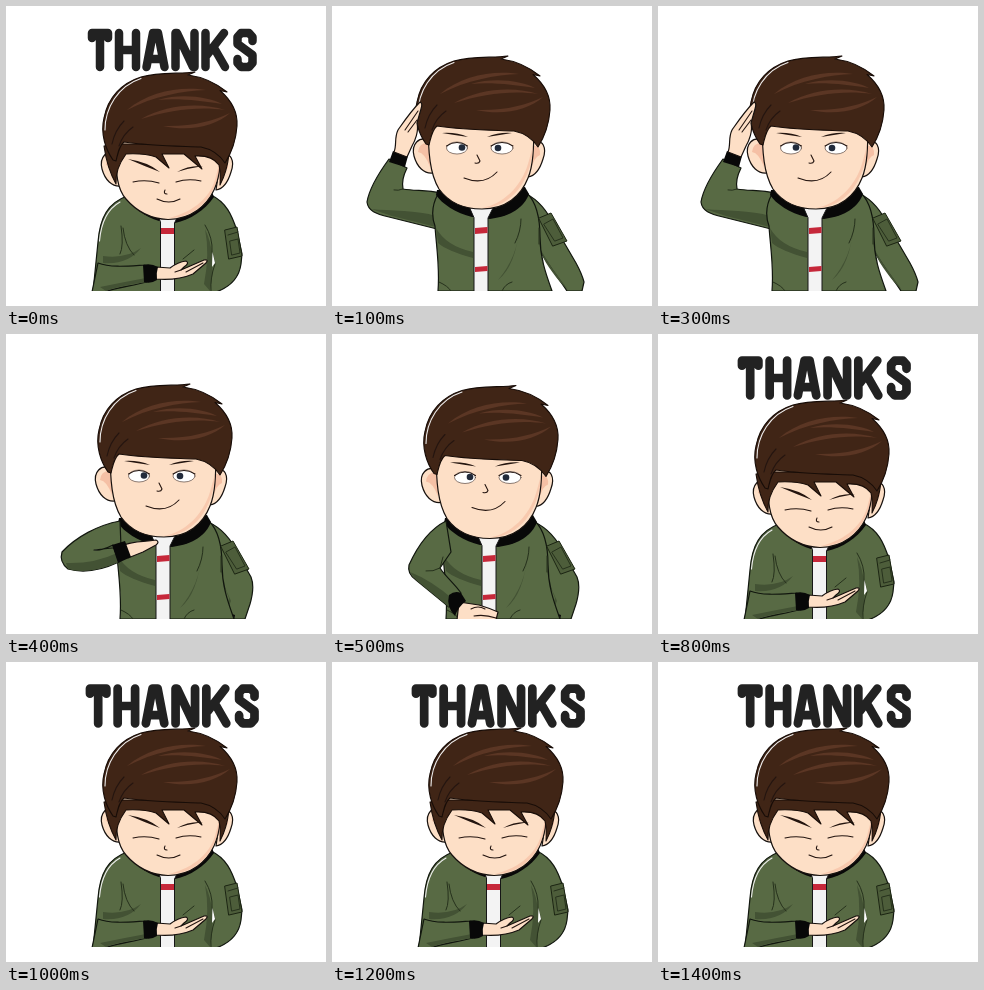
Animation of 320 by 300 pixels, one loop 1500 ms. Source, as an HTML page:

```html
<!DOCTYPE html>
<html lang="en">
<head>
<meta charset="utf-8">
<title>Thanks</title>
<style>
html, body { margin: 0; width: 100%; height: 100%; overflow: hidden; background: #fff; }
svg { display: block; width: 100%; height: 100%; }
path, ellipse { stroke-linejoin: round; stroke-linecap: round; }
.skin { fill: #fddfc6; stroke: #17110e; stroke-width: 1.2; }
.shade { fill: #f3b497; }
.jacket { fill: #586a44; stroke: #11160e; stroke-width: 1.2; }
.fold { fill: #435234; }
.crease { fill: none; stroke: #26311c; stroke-width: 1; }
.patch { fill: #4d5d3a; stroke: #1b2412; stroke-width: 1; }
.black { fill: #080808; }
.shirt { fill: #f3f3f3; stroke: #161616; stroke-width: 1; }
.red { fill: #c6283a; }
.line { fill: none; stroke: #241510; stroke-width: 1.1; }
.brow { fill: #24150f; }
.hair { fill: #402516; stroke: #170c07; stroke-width: 1.1; }
.shine { fill: #5b3624; }
.rim { fill: none; stroke: #eee; stroke-width: 1.1; }
.letters { fill: none; stroke: #222; stroke-width: 8.5; stroke-linecap: square; }
</style>
</head>
<body>
<svg viewBox="0 0 320 300">
<defs>
  <clipPath id="crop"><path d="M0 0H320V285H0Z"/></clipPath>
  <g id="ears">
    <path class="skin" d="M105 134C95 130 87 138 90 150C93 161 100 168 109 167Z"/>
    <path class="skin" d="M209 137C219 132 223 142 219 153C216 163 211 170 204 171Z"/>
    <path class="shade" d="M105 137Q95 136 94 146Q101 147 106 161ZM209 140Q217 139 216 149Q210 151 207 164Z" opacity=".7"/>
  </g>
  <g id="hair">
    <path class="hair" d="M102 138C95 128 89 112 93 96C97 75 111 61 130 55C148 50 168 52 184 50L177 53C192 55 205 61 216 70L209 68.500C220 78 227 89 226 104C225 118 221 130 214 141C208 132 200 127 190 125C165 124 140 124 113 120C108 124 107 131 105 139Z"/>
    <path class="rim" d="M94 108C94 86 107 64 130 56.500"/>
    <path class="shine" d="M116 88C138 69 170 64 195 68C171 69 143 74 116 88ZM130 97C156 82 190 80 214 88C188 84 159 88 130 97ZM147 78C171 71 197 75 211 82C191 79 168 76 147 78ZM152 104C181 105 202 99 219 91C204 104 180 110 152 104Z"/>
    <path class="line" d="M101 122Q104 108 113 99M108 124Q112 112 122 105"/>
  </g>
</defs>

<g clip-path="url(#crop)">
  <g id="stand">
    <g id="armRight">
      <path class="jacket" d="M202 188C215 194 224 206 231 221L252 257Q258 268 260 276L258 285H243C233 270 220 253 212 238Z"/>
      <path class="fold" d="M213 236C222 256 235 271 244 284L236 276C225 262 217 251 213 236Z"/>
    </g>
    <g id="armRightIn">
      <path class="jacket" d="M202 188C216 194 226 206 233 222L245 243Q249 253 244 270L239 285H218L221 267L212 240Z"/>
      <path class="fold" d="M213 240L225 267L220 279L223 264Z"/>
      <path class="black" d="M217 277L229 281L228 286H214Z"/>
    </g>
    <g id="saluteSleeve">
      <path class="jacket" d="M116 187C104 184 91 185 79 183Q77 174 83 162L65 153C54 168 45 184 43 196C44 205 52 208 65 211L113 223Z"/>
      <path class="fold" d="M47 203C66 205 94 204 112 210V221L68 210Z"/>
      <path class="crease" d="M79 183Q74 185 70 184"/>
      <path class="black" d="M69 145L84 150L81 161L65 156Z"/>
    </g>
    <path class="jacket" d="M114 188C130 202 180 204 203 187C212 196 216 211 216 231C216 252 222 268 228 285H114C116 260 112 238 111 220C107 209 109 197 114 188Z"/>
    <path class="fold" d="M112 222Q122 240 149 246V252Q123 245 114 237ZM196 218Q194 251 174 274Q192 260 196 218Z"/>
    <path class="crease" d="M115 276Q124 280 127 285M197 213Q197 225 191 237M178 285Q181 278 188 276M215 238V222"/>
    <path class="black" d="M113 184L201 181L205 188C200 201 188 210 166 213L148 211C132 207 118 198 112 189Z"/>
    <path class="shirt" d="M146 202H169L164 212V286H150V212Z"/>
    <path class="red" d="M151 222L163.500 221V227L151 228ZM151 261L163.500 260V265L151 266Z"/>
    <path class="patch" d="M215 212L227 207L243 235L229 240Z"/>
    <path class="crease" d="M220 218L229 213L239 232L231 235Z"/>

    <g id="standHead">
      <use href="#ears"/>
      <path class="skin" d="M104 112C104 148 106 168 115 183C125 197 140 203 158 203C182 203 197 190 204 172C209 160 210 145 210 112Z"/>
      <path class="shade" d="M209 140C208 173 188 202 158 202C179 198 197 181 204 158Z" opacity=".5"/>
      <path class="brow" d="M118 127Q132 126 144 131Q130 129 118 127ZM163 131Q175 126 188 127Q176 129 163 131Z"/>
      <g fill="#fff" stroke="#5b4a43" stroke-width=".7">
        <ellipse cx="133" cy="142" rx="10.500" ry="6"/>
        <ellipse cx="178" cy="142" rx="11" ry="6"/>
      </g>
      <path class="line" d="M122.500 140Q133 133 143.500 140M167 140Q178 133 189 140"/>
      <g fill="#222b3b"><circle cx="138" cy="141.500" r="3.300"/><circle cx="174" cy="142" r="3.300"/></g>
      <path class="line" d="M153 149L156 155Q155 158 151 157M140 172Q160 180 173 166"/>
      <use href="#hair"/>
    </g>

    <g id="saluteHand">
      <path class="skin" d="M70 146C73 139 70 132 74 124C81 114 87 105 96 96Q99 97 97 103L93 117C95 125 91 135 88 140L83 151Z"/>
      <path class="line" d="M81 124L94 105M84 126L93 114"/>
    </g>
    <g id="lowerArm">
      <path class="jacket" d="M114 187C92 191 70 203 56 218Q53 228 62 235C79 240 98 235 113 228L107 211Q95 217 88 216L115 213Z"/>
      <path class="fold" d="M60 229Q88 230 111 219L113 228Q83 241 62 235Z"/>
      <path class="skin" d="M118 211C127 207 137 208 150 206Q154 208 150 211L137 218L122 224Z"/>
      <path class="black" d="M106 211L119 207L125 223L112 229Z"/>
    </g>
    <g id="bellyArm">
      <path class="skin" d="M127 268L147 271Q157 274 166 278L164 286H125Z"/>
      <path class="line" d="M142 282Q152 280 164 284M139 275Q146 271 153 275"/>
      <path class="jacket" d="M114 187C98 195 86 211 77 231Q75 240 84 246L117 273L129 259C122 249 112 241 108 234L119 218Z"/>
      <path class="fold" d="M78 238Q99 246 122 266L117 273L84 246Z"/>
      <path class="crease" d="M108 234Q101 238 94 237M111 223L108 234"/>
      <path class="black" d="M117 261Q123 256 129 259L134 267Q126 273 123 282Q114 273 117 261Z"/>
    </g>
  </g>

  <g id="bow">
    <path class="jacket" d="M121 190C102 197 94 211 92 236L87 286H210C224 281 233 273 235 258L236 248L231 225C226 209 220 196 205 189Z"/>
    <path class="fold" d="M97 250Q120 253 135 242Q122 259 97 257ZM204 285C209 261 207 239 199 223Q204 248 198 278Z"/>
    <path class="crease" d="M117 222Q119 240 128 249M199 219Q207 232 206 246L209 258Q204 272 205 285M188 244L177 253M115 220Q118 240 114 248"/>
    <path d="M206.500 246L209 257L206 261Z" fill="#fff"/>
    <path class="rim" d="M93.500 235Q96 206 114 196"/>
    <path class="black" d="M120 189L206 186L208 191C199 204 184 214 169 217L153 215C139 211 126 201 120 189Z"/>
    <path class="shirt" d="M151 208H173L168.500 217V286H154.500V216Z"/>
    <path class="red" d="M155 222H168V228H155Z"/>
    <path class="patch" d="M219 224L231 221L236 250L223 253Z"/>
    <path class="crease" d="M224 235L232 233L234 247L226 249ZM222 229L232 226"/>
    <path class="jacket" d="M92 257C105 262 123 260 139 259L141 276C126 280 108 282 99 286H86Z"/>
    <path class="fold" d="M94 281Q118 276 140 272L141 276Q112 280 100 285Z"/>
    <path class="skin" d="M150 261L164 262Q172 256 180 255Q184 257 178 261L175 264L198 254Q203 253 200 257L187 268Q171 275 149 273Z"/>
    <path class="line" d="M175 264L169 266M180 266L197 257"/>
    <path class="black" d="M137 259Q145 257 152 261Q150 267 151 274Q145 278 138 276Z"/>

    <use href="#ears" x="6" y="13"/>
    <path class="skin" d="M110 130C109 172 112 184 120 193C132 207 147 213 162 213.500C186 213 201 199 208 184C213 173 215 160 215 130Z"/>
    <path class="shade" d="M214 155C213 188 192 212 163 212C188 206 206 190 210 170Z" opacity=".5"/>
    <path class="brow" d="M122 153Q142 156 154 166Q138 160 122 153ZM171 166Q182 159 197 160Q184 162 171 166Z"/>
    <path class="line" d="M127 176Q140 173 153 177M170 176Q182 172 195 175M159 184Q157 188 161 188M151 193Q163 199 174 193"/>
    <path class="hair" d="M98 140Q101 162 110 178Q109 163 120 148Q138 147 150 151L163 162L156 148H178L196 163L189 150Q206 149 213 159Q215 168 214 179Q221 166 223 148L210 138H112Z"/>
    <use href="#hair" x="5" y="16" clip-path="url(#bowHair)"/>
  </g>
</g>
<clipPath id="bowHair"><path d="M80 40H240V148H80Z"/></clipPath>

<g id="thanks" class="letters" role="img" aria-label="THANKS">
  <path d="M86 32V27H102V32M94 27V61"/>
  <path d="M113 27V61M130 27V61M113 44H130"/>
  <path d="M140.500 61L147 27H152L158.500 61M145 53H154"/>
  <path d="M169.500 61V27H171L187 61H188.500V27"/>
  <path d="M199.500 27V61M218 27L201 49M207.500 41L219 61"/>
  <path d="M246.500 35V31L243 27H235L231.500 31V38L246.500 49V57L243 61H235L231.500 57V53"/>
</g>
</svg>
<script>
const STEP = 100, LOOP = 1500;
const $ = id => document.getElementById(id);
const show = (id, on) => $(id).style.display = on ? '' : 'none';

function textScale(step) {
  if (step === 7) return 1.012;
  return step >= 8 && step % 2 === 0 ? 1.025 : 1;
}

function draw(step) {
  const standing = step >= 1 && step <= 5, salute = step <= 3;
  show('stand', standing);
  show('bow', !standing);
  show('thanks', !standing);
  ['saluteSleeve', 'saluteHand', 'armRight'].forEach(id => show(id, salute));
  show('armRightIn', !salute);
  show('lowerArm', step === 4);
  show('bellyArm', step === 5);
  $('stand').setAttribute('transform', `translate(${step < 3 ? -8 : 0} 0)`);
  $('standHead').setAttribute('transform', `translate(0 ${step === 5 ? 1.5 : 0})`);
  $('thanks').setAttribute('transform', `translate(166.5 44) scale(${textScale(step)}) translate(-166.5 -44)`);
}

function tick() {
  draw(Math.floor(performance.now() % LOOP / STEP));
  requestAnimationFrame(tick);
}
tick();
</script>
</body>
</html>
```
